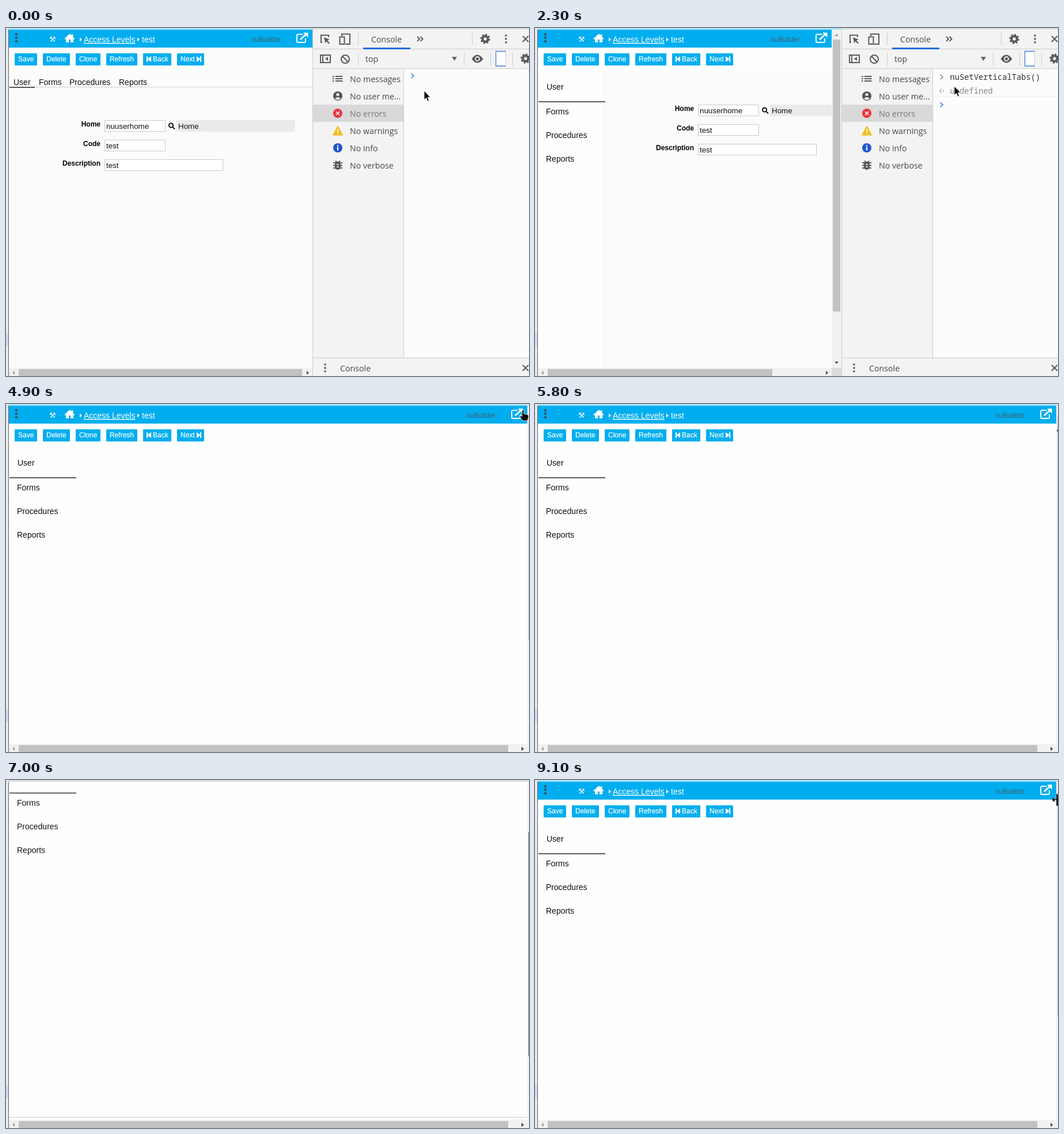
Animation, 908 px wide and 604 px high, one loop 9700 ms. Source, as an HTML page:

```html
<!DOCTYPE html>
<html lang="en">
<head>
<meta charset="utf-8">
<title>Vertical tabs demo</title>
<style>
html, body { margin: 0; width: 100%; height: 100%; overflow: hidden; background: #fff; }
svg { display: block; width: 908px; height: 604px; font-family: "Liberation Sans", Arial, sans-serif; }
text { white-space: pre; }

/* One loop is 9.7 s; 1% is 97 ms. The delay keeps changes on the tick. */
.a { animation: 9.7s step-end -20ms infinite; }

/* Layout phases: horizontal tabs, vertical tabs, console closed */
.flat { animation-name: flat; }
.narrow { animation-name: narrow; }
.stacked { animation-name: stacked; }
.notNarrow { animation-name: notNarrow; }
.closed { animation-name: closed; }
.tools { animation-name: tools; }
@keyframes flat { 0% { opacity: 1 } 18.55% { opacity: 0 } }
@keyframes narrow { 0% { opacity: 0 } 18.55% { opacity: 1 } 48.45% { opacity: 0 } }
@keyframes stacked { 0% { opacity: 0 } 18.55% { opacity: 1 } }
@keyframes notNarrow { 0% { opacity: 1 } 18.55% { opacity: 0 } 48.45% { opacity: 1 } }
@keyframes closed { 0% { opacity: 0 } 48.45% { opacity: 1 } }
@keyframes tools { 0% { opacity: 1 } 48.45% { opacity: 0 } }

.page { animation-name: page; }
.brand { animation-name: brand; }
.form { animation-name: form; }
.hthumb { animation-name: hthumb; }
.harrow { animation-name: harrow; }
@keyframes page { 0% { fill: #fcfcfb } 18.55% { fill: #fdfefd } 48.45% { fill: #fefefe } }
@keyframes brand { 0% { transform: none } 18.55% { transform: translateX(-17px) } 48.45%, 100% { transform: translateX(373px) } }
@keyframes form { 0% { transform: none } 18.55% { transform: translate(112px, -27px) } 48.45%, 100% { transform: translateY(588px) } }
@keyframes hthumb { 0% { width: 492px } 18.55% { width: 390px } 48.45%, 100% { width: 850px } }
@keyframes harrow { 0% { transform: none } 18.55% { transform: translateX(-17px) } 48.45%, 100% { transform: translateX(373px) } }

/* Dragging the scrollbar down and back */
.scroll { animation-name: scroll; }
.vthumb { animation-name: drag, press; }
.edge { animation-name: edge; }
@keyframes scroll {
  0% { transform: none }
  69.07% { transform: translateY(0); animation-timing-function: steps(7) }
  76.29%, 82.47% { transform: translateY(-246px) }
  83.5% { transform: translateY(-215px); animation-timing-function: steps(5) }
  88.65%, 100% { transform: translateY(0) }
}
@keyframes drag {
  0% { transform: none }
  69.07% { transform: translateY(0); animation-timing-function: steps(7) }
  76.29%, 82.47% { transform: translateY(163px) }
  83.5% { transform: translateY(142px); animation-timing-function: steps(5) }
  88.65%, 100% { transform: translateY(0) }
}
@keyframes press { 0% { fill: #bdbdbd } 63.91% { fill: #a0a0a0 } 69.07% { fill: #686868 } 92.78%, 100% { fill: #bdbdbd } }
@keyframes edge { 0% { opacity: 1 } 70.1% { opacity: 0 } 88.65%, 100% { opacity: 1 } }

/* Console input and carets */
.typed { animation-name: typed; }
.caret1 { animation-name: caret1; }
.caret2 { animation-name: caret2; }
.caret3 { animation-name: caret3; }
.tip { animation-name: tip; }
@keyframes typed { 0% { opacity: 0 } 11.34% { opacity: 1 } 18.55% { opacity: 0 } }
@keyframes caret1 { 0% { opacity: 0 } 5.15% { opacity: 1 } 11.34%, 100% { opacity: 0 } }
@keyframes caret2 { 0% { opacity: 0 } 11.34% { opacity: 1 } 16.49%, 100% { opacity: 0 } }
@keyframes caret3 {
  0%, 23.71%, 35.05%, 45.36%, 100% { opacity: 0 }
  18.55%, 29.89%, 40.2% { opacity: 1 }
}
@keyframes tip { 0% { opacity: 0 } 40.2% { opacity: 1 } 48.45%, 100% { opacity: 0 } }

/* Pointers */
.arrow { animation-name: arrow, tools; }
.hand { animation-name: hand, handOn; }
.resize { animation-name: resize; }
@keyframes arrow {
  0% { transform: translate(726px, 109px); animation-timing-function: steps(5) }
  5.15% { transform: translate(728px, 101px) }
  34.02% { transform: translate(728px, 101px); animation-timing-function: steps(4) }
  38.14%, 100% { transform: translate(902px, 11px) }
}
@keyframes hand {
  0% { transform: translate(897px, 10px) }
  55.67% { transform: translate(897px, 10px); animation-timing-function: steps(5) }
  60.82%, 100% { transform: translate(914px, 40px) }
}
@keyframes handOn { 0% { opacity: 0 } 48.45% { opacity: 1 } 60.82%, 100% { opacity: 0 } }
@keyframes resize { 0% { opacity: 0 } 92.78% { opacity: 1 } }

.btn text { font-size: 12px; fill: #fff; stroke: #fff; stroke-width: .2; }
.btn rect { fill: #00aeef; }
.tab { font-size: 14px; fill: #111; }
.label { font-size: 12px; font-weight: bold; text-anchor: end; }
.value { font-size: 13.33px; fill: #111; }
.box { fill: #fff; stroke: #c9c9c9; }
.ui { font: 14.2px "Open Sans", "Noto Sans", sans-serif; fill: #484848; }
.code { font: 13.75px "Noto Sans Mono", "DejaVu Sans Mono", monospace; fill: #303030; }
.sep { stroke: #ccc; }
.line { fill: none; stroke: #5a5a5a; stroke-width: 2; }
</style>
</head>
<body>
<svg viewBox="0 0 908 604">
  <defs>
    <clipPath id="view"><rect x="5" y="3" width="900" height="587"/></clipPath>
    <g id="gear" fill="none" stroke="#5a5a5a">
      <circle r="4.7" stroke-width="4"/>
      <circle r="7.2" stroke-width="3" stroke-dasharray="3 2.65"/>
    </g>
    <g id="dots" fill="#5a5a5a"><circle cy="-6" r="1.8"/><circle r="1.8"/><circle cy="6" r="1.8"/></g>
    <path id="cross" class="line" d="M-5-5 5 5M5-5-5 5"/>
    <path id="chevron" d="M-2.5-4 2 0-2.5 4" fill="none" stroke-width="1.6"/>
    <path id="tri" d="M0-3.5 4 0 0 3.5z"/>
    <path id="skip" d="M0-5h2v4.5L8-5V5L2 .5V5H0z" fill="#fff"/>
  </defs>

  <rect class="a page" width="908" height="604"/>

  <g clip-path="url(#view)">
    <g class="a scroll">
      <g class="a form">
        <rect x="5" y="102" width="910" height="700" fill="#fbfbf9"/>
        <path class="a notNarrow" d="M5 102.5h899" stroke="#cdcdcb"/>
        <text class="label" x="164" y="171">Home</text>
        <text class="label" x="164" y="205">Code</text>
        <text class="label" x="164" y="239">Description</text>
        <rect class="box" x="171.5" y="160.5" width="105" height="19"/>
        <rect class="box" x="171.5" y="194.5" width="105" height="19"/>
        <rect class="box" x="171.5" y="228.5" width="205" height="19"/>
        <rect x="296" y="160" width="206" height="20" fill="#ebebeb"/>
        <g fill="none" stroke="#111" stroke-width="2"><circle cx="286.5" cy="169" r="3.6"/><path d="M289 171.6 293 175.5"/></g>
        <text class="value" x="174" y="175">nuuserhome</text>
        <text class="value" x="299" y="175">Home</text>
        <text class="value" x="174" y="209">test</text>
        <text class="value" x="174" y="243">test</text>
      </g>

      <g class="a flat tab">
        <text x="13" y="99">User</text><text x="57" y="99">Forms</text>
        <text x="110" y="99">Procedures</text><text x="196" y="99">Reports</text>
        <rect x="6" y="102" width="44" height="2" fill="#555"/>
      </g>
      <g class="a stacked tab">
        <text x="20" y="107">User</text><text x="19" y="150">Forms</text>
        <text x="19" y="191">Procedures</text><text x="19" y="232">Reports</text>
        <rect x="6" y="127" width="116" height="2" fill="#615c62"/>
      </g>

      <rect x="5" y="3" width="900" height="31" fill="#00aeef"/>
      <path d="M16 9h4v4h-4zM16 15h4v4h-4zM16 21h4v4h-4z" fill="#3d5763"/>
      <text x="75" y="24" font-size="13" fill="#fff" font-family="DejaVu Sans, sans-serif">⚒</text>
      <path d="M101.500 18.500 110.500 10l3 2.800V11h3v4.700l3 2.800-1.200 1.200-1.300-1.200V25h-5v-5h-3v5h-5v-6.500l-1.300 1.200z" fill="#fff"/>
      <g fill="#fff">
        <use href="#tri" x="128" y="20"/><use href="#tri" x="228" y="20"/>
        <text x="135" y="25" font-size="14" text-decoration="underline">Access Levels</text>
        <text x="236" y="25" font-size="14">test</text>
      </g>
      <g class="a brand">
        <text x="426" y="24" font-size="12" fill="#3f6070">nuBuilder</text>
        <g fill="none" stroke="#fff" stroke-width="2">
          <path d="M515 11h-8q-2 0-2 2v10q0 2 2 2h11q2 0 2-2v-5"/><path d="M511 20 521 11" stroke-width="3"/>
        </g>
        <path d="M516 8h8.500v8.500z" fill="#fff"/>
      </g>

      <g class="btn">
        <rect x="15" y="44" width="39" height="21" rx="1"/><text x="21" y="58">Save</text>
        <rect x="64" y="44" width="47" height="21" rx="1"/><text x="70" y="58">Delete</text>
        <rect x="121" y="44" width="43" height="21" rx="1"/><text x="127" y="58">Clone</text>
        <rect x="174" y="44" width="54" height="21" rx="1"/><text x="180" y="58">Refresh</text>
        <rect x="238" y="44" width="49" height="21" rx="1"/><text x="255" y="58">Back</text>
        <rect x="297" y="44" width="47" height="21" rx="1"/><text x="303" y="58">Next</text>
        <use href="#skip" x="244" y="54"/><use href="#skip" transform="translate(339 54) scale(-1 1)"/>
      </g>
    </g>
  </g>

  <!-- Window edges and scrollbars -->
  <rect width="908" height="3" fill="#dcdcdf"/>
  <rect class="a edge" x="5" width="900" height="3" fill="#a9e3f2"/>
  <rect width="4" height="604" fill="#e9e9eb"/>
  <rect y="530" width="4" height="22" fill="#d6d6f0"/>
  <rect x="4" y="3" width="1" height="601" fill="#5c6468"/>
  <rect x="5" y="590" width="903" height="14" fill="#f1f1f1"/>
  <rect class="a hthumb" x="22" y="592" width="492" height="12" fill="#c1c1c1"/>
  <path d="M15 595v7l-4-3.500z" fill="#a3a3a3"/>
  <path class="a harrow" d="M522 595v7l4-3.500z" fill="#505050"/>
  <g class="a narrow">
    <rect x="515" y="3" width="17" height="587" fill="#f1f1f1"/>
    <rect x="515" y="590" width="17" height="14" fill="#dcdcdc"/>
    <rect x="517" y="20" width="13" height="472" fill="#c1c1c1"/>
    <path d="M520 14h7l-3.500-4z" fill="#a3a3a3"/><path d="M520 579h7l-3.500 4z" fill="#505050"/>
  </g>
  <g class="a closed">
    <rect x="905" y="3" width="3" height="601" fill="#f1f1f1"/>
    <rect class="a vthumb" x="907" y="20" width="1" height="390"/>
    <path d="M895 595v7l4-3.500z" fill="#505050"/>
  </g>

  <!-- Console panel -->
  <g class="a tools">
    <rect x="532" width="376" height="604" fill="#f3f3f3"/>
    <rect x="532" width="376" height="2" fill="#d9d9d9"/>
    <rect x="691" y="71" width="217" height="501" fill="#fcfcfc"/>
    <rect x="533" y="133" width="157" height="30" fill="#d9d9d9"/>
    <path class="sep" d="M532.500 2V604M533 36.500H908M533 70.500H908M690.500 71V572M533 572.500H908M611.500 8V30M809.500 8V30M611.500 43V65M795.500 43V65M841.500 43V65M879.500 43V65"/>

    <path class="line" d="M549 25h-2V12.500h13V16" stroke-width="1.500"/>
    <path d="M552 16l10 4-4 1.500 4 4.500-1.500 1.500-4.500-4.500-1.500 4z" fill="#5a5a5a"/>
    <path class="line" d="M583 14V10.500h14V28h-8M579.500 15.500h8v12.500h-8z" stroke-width="1.700"/>
    <text class="ui" x="634" y="25">Console</text>
    <rect x="620" y="34" width="82" height="3" fill="#1a6fdc"/>
    <path class="line" d="M714 15l4 4-4 4M719.500 15l4 4-4 4" stroke-width="1.700"/>
    <use href="#gear" x="832" y="19"/><use href="#dots" x="868" y="19"/><use href="#cross" x="902" y="19"/>

    <path class="line" d="M546 47h17v13h-17zM550 47v13" stroke-width="1.600"/><path d="M559 50v7l-5-3.500z" fill="#5a5a5a"/>
    <g class="line"><circle cx="589" cy="54" r="7"/><path d="M584 49 594 59"/></g>
    <text class="ui" x="624" y="59">top</text>
    <path d="M774 50h9l-4.500 7z" fill="#666"/>
    <path d="M808.500 53.500q9.500-14 20 0-10 14-20 0z" fill="#5a5a5a"/>
    <circle cx="818.500" cy="53.500" r="3.500" fill="#5a5a5a" stroke="#f3f3f3" stroke-width="1.800"/>
    <path d="M868 40.500H850.500V66H868" fill="#fff" stroke="#3b7fd6" stroke-width="1.300"/><path class="sep" d="M867.500 41V66"/>
    <use href="#gear" x="902" y="53"/>

    <g class="ui">
      <text x="597" y="94">No messages</text><text x="597" y="124">No user me...</text>
      <text x="597" y="154" fill="#777">No errors</text><text x="597" y="184">No warnings</text>
      <text x="597" y="214">No info</text><text x="597" y="244">No verbose</text>
      <text x="580" y="596">Console</text>
    </g>
    <path class="line" d="M572 84h12.500M572 88h12.500M572 92h12.500" stroke-width="1.800"/>
    <path class="line" d="M567 84h2.500M567 88h2.500M567 92h2.500" stroke-width="1.800"/>
    <circle cx="576" cy="118" r="8" fill="#555"/><circle cx="576" cy="115.500" r="2.600" fill="#f3f3f3"/>
    <path d="M571 122.500q5-5 10 0-5 4.500-10 0z" fill="#f3f3f3"/>
    <circle cx="576" cy="148" r="8" fill="#e8343f"/><path d="M573 145l6 6M579 145l-6 6" stroke="#fff" stroke-width="1.600"/>
    <path d="M576 170 584.500 186h-17z" fill="#f0bd18" stroke="#f0bd18" stroke-linejoin="round"/>
    <path d="M576 175v6M576 182.500v2" stroke="#fff" stroke-width="1.800"/>
    <circle cx="576" cy="208" r="8" fill="#2256cc"/><path d="M576 203v2.200M576 206.500v6" stroke="#fff" stroke-width="2.200"/>
    <path class="line" d="M568 234h16M568 238.500h16M568 243h16M572 230.500l3 3M580 230.500l-3 3" stroke-width="1.700"/>
    <rect x="571" y="232" width="10" height="14" rx="5" fill="#555"/><path d="M574 237h4M574 241h4" stroke="#f3f3f3" stroke-width="1.500"/>
    <use href="#dots" x="554" y="590"/><use href="#cross" x="902" y="590"/>

    <g class="a flat"><use href="#chevron" x="706" y="83" stroke="#2f7be0"/></g>
    <text class="a typed code" x="720.500" y="88">nuSetVerticalTabs()</text>
    <rect class="a caret1" x="721" y="74" width="1" height="18"/>
    <rect class="a caret2" x="877" y="74" width="1" height="18"/>
    <g class="a stacked">
      <use href="#chevron" x="706" y="85" stroke="#8a8a8a"/>
      <text class="code" x="720.500" y="90">nuSetVerticalTabs()</text>
      <path d="M706 105.500 702.500 109 706 112.500" fill="none" stroke="#aaa" stroke-width="1.400"/><circle cx="708.500" cy="109" r="1.200" fill="#aaa"/>
      <text class="code" x="720.500" y="114" fill="#888" style="fill:#888">undefined</text>
      <path d="M691 119.500H908" stroke="#eee"/>
      <use href="#chevron" x="706" y="133" stroke="#2f7be0"/>
    </g>
    <rect class="a caret3" x="721" y="124" width="1" height="18"/>
    <g class="a tip">
      <rect x="862.500" y="39.500" width="60" height="30" fill="#f5f5f5" stroke="#cfcfcf"/>
      <text class="ui" x="872" y="60">Close</text>
    </g>
  </g>

  <!-- Pointers -->
  <path class="a arrow" d="M0 0V15.500L3.500 12.200 6 18 8.500 17 6 11.300H10.500z" stroke="#fff" stroke-width=".8"/>
  <path class="a hand" d="M-1 1q1.500-2 3 0V7l7 1.500q1.500 1 1 4L8.500 19H0l-5-7q0-2 2-1.500l2 1.500z" stroke="#fff" stroke-width=".8"/>
  <path class="a resize" d="M897 34l5-5v4h3V23l3 3v19h-3V35h-3v4z" stroke="#fff" stroke-width=".5"/>
</svg>
</body>
</html>
```
